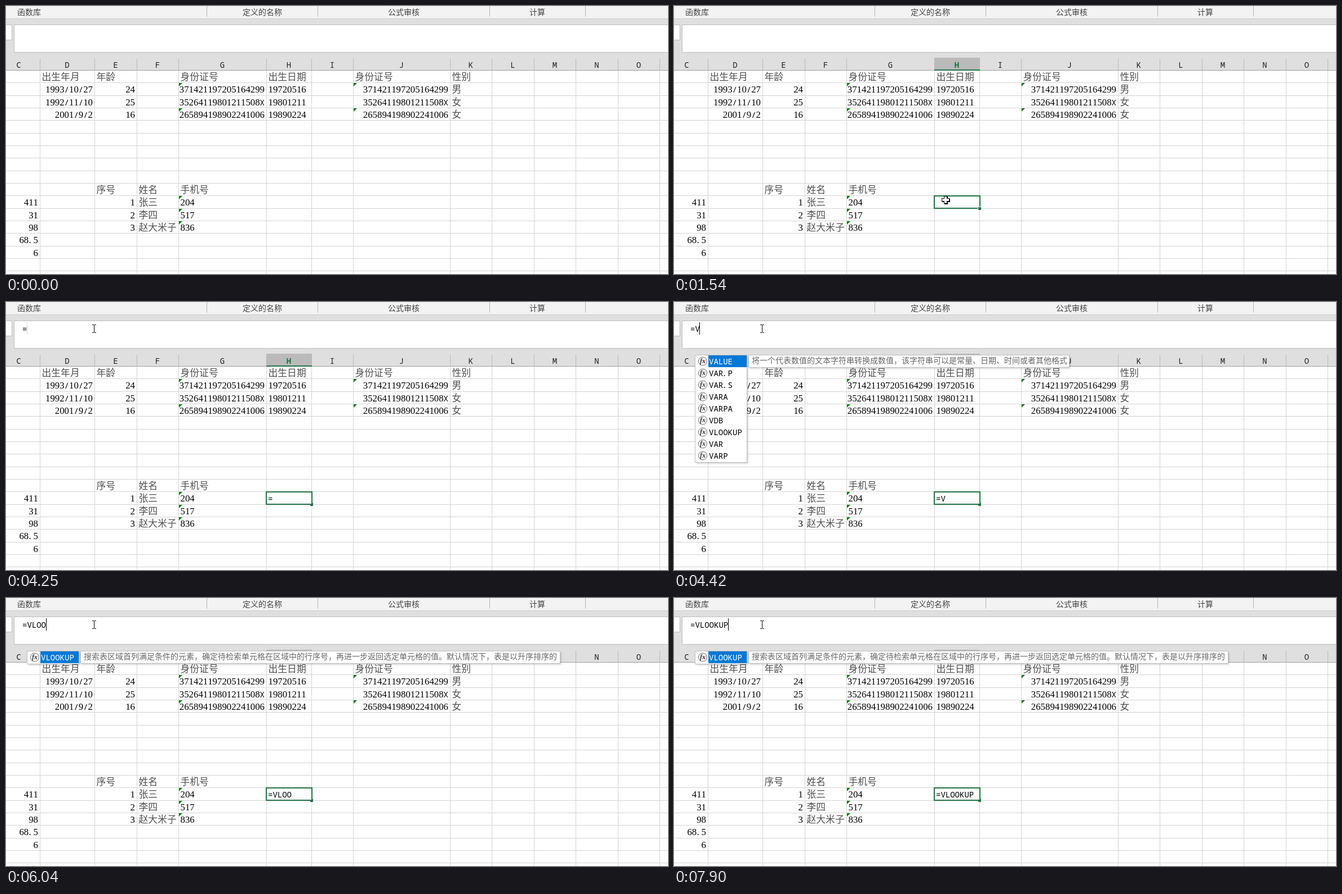
Write an HTML page with a canvas that moves like this. It is 1175 px wide and 477 px high and loops after 8 s.

```html
<!DOCTYPE html>
<html lang="zh-CN">
<head>
<meta charset="utf-8">
<style>
html, body { margin: 0; width: 100%; height: 100%; overflow: hidden; background: #fff; }
canvas { display: block; }
</style>
</head>
<body>
<canvas id="stage" width="1175" height="477"></canvas>
<script>
const ctx = document.getElementById('stage').getContext('2d');
const GREEN = '#217346', LOOP = 8000, PITCH = 8.4;
const CJK = '"Noto Sans CJK SC", "Noto Sans CJK", sans-serif';
const columns = { C: -15, D: 60, E: 157, F: 232, G: 306, H: 462, I: 542, J: 616, K: 788,
                  L: 862, M: 937, N: 1011, O: 1086, P: 1160 };
const names = Object.keys(columns);
const rowTop = row => Math.round(114 + 22.33 * (row - 1));

// Each entry: column, first row, alignment, values going down
const cells = [
  ['D', 1, 'l', '出生年月'], ['D', 2, 'r', '1993/10/27', '1992/11/10', '2001/9/2'],
  ['E', 1, 'l', '年龄'], ['E', 2, 'r', '24', '25', '16'],
  ['G', 1, 'l', '身份证号'],
  ['G', 2, 'r', '371421197205164299', '35264119801211508X', '265894198902241006'],
  ['H', 1, 'l', '出生日期', '19720516', '19801211', '19890224'],
  ['J', 1, 'l', '身份证号'],
  ['J', 2, 'r', '371421197205164299', '35264119801211508X', '265894198902241006'],
  ['K', 1, 'l', '性别', '男', '女', '女'],
  ['E', 10, 'l', '序号'], ['E', 11, 'r', '1', '2', '3'],
  ['F', 10, 'l', '姓名', '张三', '李四', '赵大米子'],
  ['G', 10, 'l', '手机号', '204', '517', '836'],
  ['C', 11, 'r', '411', '31', '98', '68.5', '6']
];
const textMarks = [['G', 2], ['G', 4], ['J', 2], ['J', 4], ['G', 11], ['G', 12], ['G', 13]];

const formula = '=VLOOKUP';
const keyTimes = [3790, 4420, 4630, 4860, 6040, 6890, 7440, 7900];
const fades = [[2780, 0], [3330, 1], [4170, 0], [5260, 0], [5810, 1], [6430, 0], [7350, 0]];
const vNames = ['VALUE', 'VAR.P', 'VAR.S', 'VARA', 'VARPA', 'VDB', 'VLOOKUP', 'VAR', 'VARP'];
const valueTip = '将一个代表数值的文本字符串转换成数值，该字符串可以是常量、日期、时间或者其他格式';
const lookupTip = '搜索表区域首列满足条件的元素，确定待检索单元格在区域中的行序号，' +
  '再进一步返回选定单元格的值。默认情况下，表是以升序排序的';

function box(x, y, w, h, color) {
  ctx.fillStyle = color;
  ctx.fillRect(x, y, w, h);
}

function framed(x, y, w, h, border) {
  box(x, y, w, h, border);
  box(x + 1, y + 1, w - 2, h - 2, '#fff');
}

function label(str, x, y, font, color = '#000', align = 'left') {
  ctx.font = font;
  ctx.fillStyle = color;
  ctx.textAlign = align;
  ctx.fillText(str, x, y);
}

// Half-width characters on a fixed pitch, full-width ones on twice that
function cellText(str, x, y, color = '#000') {
  for (const ch of str) {
    if (ch > '\u2000') {
      label(ch, x, y, '300 16.8px ' + CJK, '#505050');
      x += 2 * PITCH;
      continue;
    }
    const font = /[\d.]/.test(ch) ? '16.8px "Liberation Serif", serif'
      : '300 14px "Noto Sans Mono", monospace';
    label(ch, x + (ch === '.' ? 2.5 : PITCH / 2), y, font, color, 'center');
    x += PITCH;
  }
}

function drawChrome(selected) {
  box(0, 0, 1175, 114, '#dfdfdf');
  box(0, 0, 1175, 22, '#f3f3f3');
  box(0, 22, 1175, 1, '#cfcfcf');
  for (const x of [356, 553, 858, 1028]) box(x, 0, 1, 19, '#b5b5b5');
  [['函数库', 41], ['定义的名称', 455], ['公式审核', 706], ['计算', 943]].forEach(([s, x]) =>
    label(s, x, 16, '14px ' + CJK, '#444', 'center'));
  framed(-2, 33, 13, 28, '#bdbdbd');
  framed(14, 33, 1163, 50, '#bdbdbd');
  names.forEach((name, i) => {
    const x = columns[name], right = columns[names[i + 1]] ?? 1235;
    const active = selected && name === 'H';
    if (active) box(x, 92, right - x + 1, 22, '#bababa');
    box(x, 94, 1, 20, '#b8b8b8');
    label(name, (x + right) / 2, 110, (active ? 600 : 400) + ' 14px "Noto Sans Mono", monospace',
      active ? GREEN : '#222', 'center');
  });
  box(0, 114, 1175, 1, '#9f9f9f');
  if (selected) box(462, 113, 81, 2, GREEN);
}

function drawSheet() {
  box(0, 115, 1175, 362, '#fff');
  for (const name of names) box(columns[name], 115, 1, 362, '#d4d4d4');
  for (let row = 2; row <= 17; row++) box(0, rowTop(row), 1175, 1, '#d4d4d4');
  for (const [col, row, align, ...values] of cells) {
    const right = columns[names[names.indexOf(col) + 1]] - 3;
    values.forEach((v, i) => {
      const x = align === 'r' ? right - v.length * PITCH : columns[col] + 3.5;
      cellText(v, x, rowTop(row + i) + 18);
    });
  }
  ctx.fillStyle = '#107c10';
  for (const [col, row] of textMarks) {
    const x = columns[col] + 1, y = rowTop(row) + 1;
    ctx.beginPath();
    ctx.moveTo(x, y);
    ctx.lineTo(x + 6, y);
    ctx.lineTo(x, y + 6);
    ctx.fill();
  }
}

function drawSelection(editing, text) {
  ctx.strokeStyle = GREEN;
  ctx.lineWidth = 2;
  ctx.strokeRect(462, 338, 81, 22);
  if (!editing) box(539, 357, 6, 6, '#fff');
  box(540, 358, 5, 5, GREEN);
  if (editing) box(539, 357, 3, 2, '#fff');
  cellText(text, 465, 355);
}

function popup(x, y, w, h) {
  ctx.save();
  ctx.shadowColor = 'rgba(0,0,0,.2)';
  ctx.shadowBlur = 3;
  ctx.shadowOffsetX = ctx.shadowOffsetY = 1.5;
  box(x, y, w, h, '#bdbdbd');
  ctx.restore();
  box(x + 1, y + 1, w - 2, h - 2, '#fff');
}

function drawSuggestions(items, tip, tipRight) {
  popup(37, 94, 93, items.length * 21 + 3);
  items.forEach((item, i) => {
    const y = 95 + i * 21;
    if (!i) box(61, y, 68, 21, '#0078d7');
    ctx.strokeStyle = '#666';
    ctx.lineWidth = 1;
    ctx.beginPath();
    ctx.arc(51, y + 10.5, 7.5, 0, 7);
    ctx.stroke();
    label('fx', 51, y + 14, 'italic bold 12px "Liberation Serif", serif', '#333', 'center');
    cellText(item, 62, y + 16, i ? '#000' : '#fff');
  });
  popup(132, 94, tipRight - 132, 23);
  label(tip, 138, 109, '14px ' + CJK, '#666');
}

function plus(x, y, arm, half, color) {
  box(x - arm, y - half, 2 * arm, 2 * half, color);
  box(x - half, y - arm, 2 * half, 2 * arm, color);
}

function drawPointer(x, y) {
  x = Math.round(x);
  y = Math.round(y);
  if (y > 84) {
    plus(x + 1, y + 1, 7, 3, '#000');
    plus(x, y, 7, 3, '#000');
    plus(x, y, 6, 2, '#fff');
  } else {
    box(x, y - 6, 1, 13, '#000');
    for (const dy of [-7, 7]) {
      box(x - 3, y + dy, 3, 1, '#000');
      box(x + 1, y + dy, 3, 1, '#000');
    }
  }
}

function pointerAt(t) {
  if (t < 370) return null;
  if (t < 1070) {
    const p = Math.min(7, Math.floor((t - 370) / 80)) / 7, q = 1 - p;
    return [q * q * 764 + 2 * p * q * 560 + p * p * 495, q * q * 427 + 2 * p * q * 270 + p * p * 361];
  }
  if (t < 1540) return [486, 350];
  const p = Math.min(1, Math.floor((t - 1540) / 77) / 9), e = p * p * (3 - 2 * p);
  return [482 - 326 * e, 345 - 298 * e];
}

function caretAlpha(t, since) {
  const fade = fades.filter(f => f[0] <= t && f[0] >= since).pop();
  if (!fade) return 1;
  const step = Math.min(2, Math.floor((t - fade[0]) / 75));
  return (fade[1] ? [.15, .5, 1] : [.5, .15, 0])[step];
}

function draw() {
  const t = performance.now() % LOOP;
  const typed = keyTimes.filter(k => k <= t).length;
  const text = formula.slice(0, typed);
  const selected = t >= 1070, editing = t >= 2310;

  drawChrome(selected);
  drawSheet();
  if (selected) drawSelection(editing, text);
  cellText(text, 29, 53);
  if (editing) {
    const alpha = caretAlpha(t, typed ? keyTimes[typed - 1] : 2310);
    box(Math.floor(29 + typed * PITCH), 36, 1, 22, `rgba(0,0,0,${alpha})`);
  }
  if (typed === 2) drawSuggestions(vNames, valueTip, 702);
  if (typed > 2) drawSuggestions(['VLOOKUP'], lookupTip, 984);
  const pointer = pointerAt(t);
  if (pointer) drawPointer(...pointer);
  requestAnimationFrame(draw);
}
draw();
</script>
</body>
</html>
```
